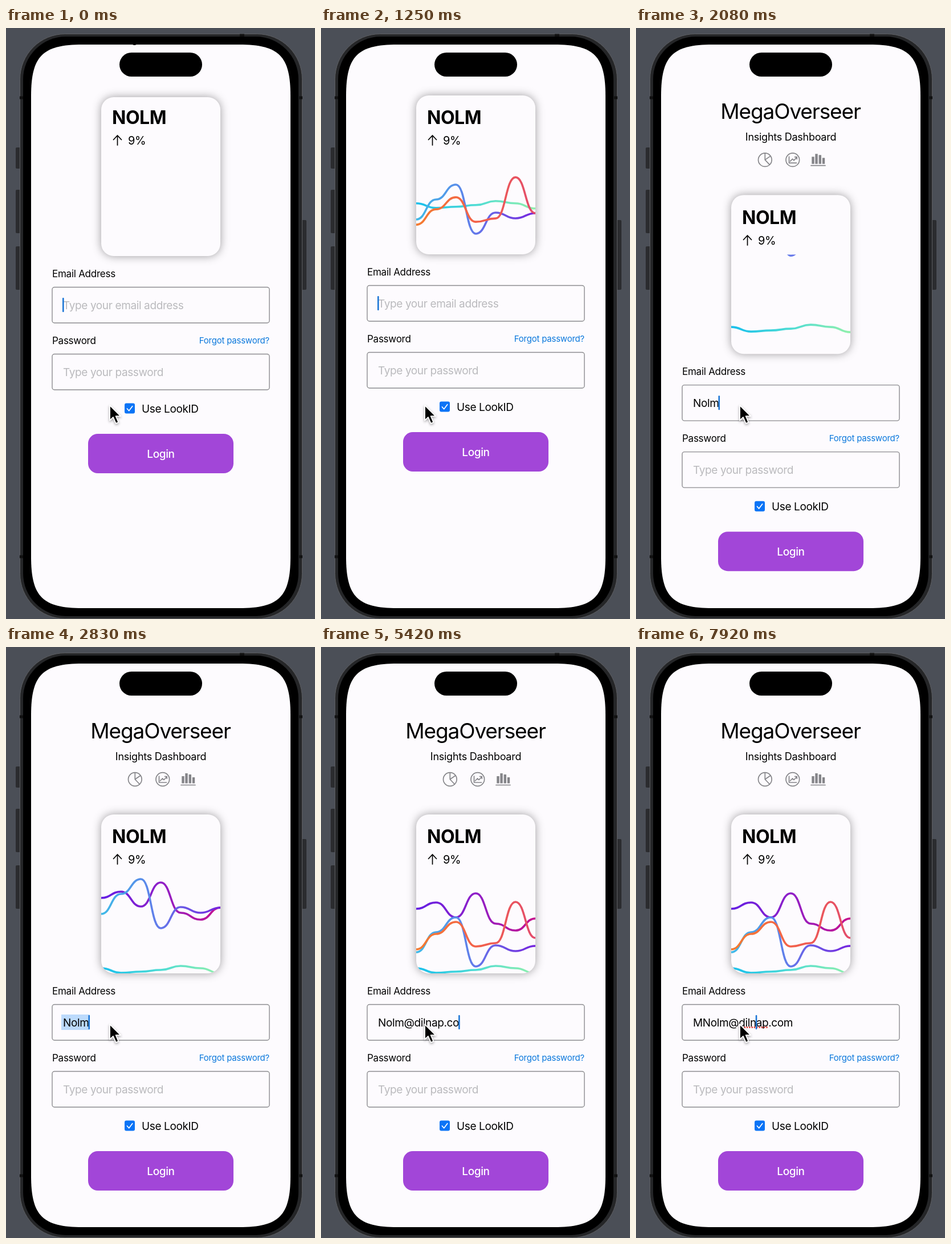
These frames come from a looping animation (542 by 1034 pixels, 8000 ms). An HTML page:

```html
<!DOCTYPE html>
<html lang="en">
<head>
<meta charset="utf-8">
<title>Login screen</title>
<style>
  html, body { margin: 0; width: 100%; height: 100%; overflow: hidden; background: #4b4f57; }
  svg { display: block; width: 542px; height: 1034px; }
  text { font-family: Inter, "Open Sans", sans-serif; letter-spacing: -.015em; white-space: pre; }
  .body { font-size: 19px; letter-spacing: -.02em; }
  .label { font-size: 17px; }
  .hint { fill: #bababd; }
  .field { fill: none; stroke: #8c8c8f; stroke-width: 1.4; }
  .icon { fill: none; stroke: #858589; stroke-width: 1.7; stroke-linecap: round; stroke-linejoin: round; }
  .card { fill: #fdfbfe; filter: drop-shadow(0 0 8px rgba(0, 0, 0, .38)); }
  .touch circle { fill: rgba(196, 196, 198, .76); stroke: #808083; stroke-width: 1.3; filter: drop-shadow(1px 3px 4px rgba(0, 0, 0, .3)); }
  .pointer { fill: #000; stroke: #fff; stroke-width: 1.8; stroke-linejoin: round; filter: drop-shadow(0 2px 2px rgba(0, 0, 0, .35)); }
</style>
</head>
<body>
<svg viewBox="0 0 542 1034">
  <defs>
    <path id="glass" d="M44 119C44 49 64 29 134 29H409C479 29 499 49 499 119V925C499 995 479 1015 409 1015H134C64 1015 44 995 44 925Z"/>
    <clipPath id="screen"><use href="#glass"/></clipPath>
    <clipPath id="plot"><path d="M167 397H376V549a22 22 0 0 1-22 22H189a22 22 0 0 1-22-22Z"/></clipPath>
  </defs>

  <g fill="#2b2c2f">
    <rect x="17" y="209" width="9" height="37" rx="2"/>
    <rect x="17" y="283" width="9" height="76" rx="2"/>
    <rect x="17" y="382" width="9" height="76" rx="2"/>
    <rect x="518" y="336" width="9" height="122" rx="2"/>
  </g>
  <rect x="24.5" y="10.5" width="495" height="1023" rx="79" fill="#252628" stroke="#5d5e61"/>
  <path d="M24 122h6m484 0h6M24 925h6m484 0h6M410 13h8" stroke="#111" stroke-width="5"/>
  <rect x="30" y="15" width="483" height="1014" rx="75"/>
  <use href="#glass" fill="#fdfbfe"/>

  <g clip-path="url(#screen)">
    <g id="page">
      <text x="271" y="160" font-size="37" text-anchor="middle" style="letter-spacing:-.03em">MegaOverseer</text>
      <text x="271.5" y="198" font-size="18" text-anchor="middle">Insights Dashboard</text>
      <g class="icon">
        <circle cx="226.3" cy="231.5" r="11.8"/>
        <path d="M226.3 220v11.5l9.5-6.5M226.3 231.5l8 8.5"/>
        <circle cx="274.8" cy="231.5" r="11.8"/>
        <path d="M268.5 226v11h13M270.5 234l4-4 2.5 2.5 5-5.5M278.5 226.5h3.7v3.7"/>
        <path d="M307 241.5h25"/>
      </g>
      <path d="M310.5 226v12.5M316.5 221v17.5M322.8 223v15.5M329 228v10.5" stroke="#858589" stroke-width="4.4"/>
      <rect class="card" x="167" y="293" width="209" height="278" rx="22"/>
    </g>

    <g id="cardText">
      <text x="186" y="343" font-size="32" font-weight="700">NOLM</text>
      <path d="M195.5 380v-17M188.5 370.5l7-7.5 7 7.5" fill="none" stroke="#000" stroke-width="1.7" stroke-linecap="round"/>
      <text x="214" y="378.5" font-size="20">9%</text>
    </g>

    <g id="form">
      <g id="lines" clip-path="url(#plot)" fill="none" stroke-width="3.6"></g>
      <text class="label" x="81" y="608">Email Address</text>
      <rect class="field" x="81" y="625.5" width="381" height="62.5" rx="4"/>
      <rect id="selection" x="97" y="643" width="52" height="27" fill="#bcdafc"/>
      <text id="hint" class="body hint" x="100" y="664">Type your email address</text>
      <text id="email" class="body" x="100" y="664"></text>
      <path id="spelling" stroke="#df3a31" stroke-width="2.8" stroke-linecap="round" stroke-dasharray="0 4.3"/>
      <rect id="caret" y="644" width="2.6" height="25" rx="1" fill="#1c76d6"/>
      <text class="label" x="81" y="725">Password</text>
      <text x="462" y="724" font-size="15" text-anchor="end" fill="#0b78dc">Forgot password?</text>
      <rect class="field" x="81" y="742.5" width="381" height="62.5" rx="4"/>
      <text class="body hint" x="100" y="781">Type your password</text>
      <rect x="208" y="828.5" width="18" height="18" rx="3" fill="#0b74f6"/>
      <path d="M212.5 838l3.2 3.7 6-8" fill="none" stroke="#fff" stroke-width="1.7" stroke-linecap="round" stroke-linejoin="round"/>
      <text class="body" x="238" y="845">Use LookID</text>
      <rect x="144" y="882" width="255" height="69" rx="17" fill="#a246d8"/>
      <text class="body" x="271.5" y="923.5" font-weight="500" text-anchor="middle" fill="#fff">Login</text>
    </g>
  </g>

  <rect x="199" y="43" width="145" height="42" rx="21"/>
  <g id="touches" class="touch">
    <circle cx="182" cy="664" r="23.5"/>
    <circle cx="361.5" cy="380.5" r="23.5"/>
  </g>
  <path class="pointer" d="M182 660v26.5l6-5.5 4.7 10.8 4.6-2-4.6-10.6h8.4Z"/>
</svg>

<script>
const FPS = 12, LOOP = 8000, KEYBOARD_LIFT = -175;
const TYPED = 'Nolm@dilnap.com';
const KEY_TICKS = [18, 20, 23, 25, 44, 48, 50, 52, 54, 56, 58, 61, 63, 65, 67];
// [tick, caret index] once typing is over
const CARET_MOVES = [[70, 12], [71, 11], [72, 5], [74, 4], [75, 0], [77, 1],
                     [85, 5], [87, 6], [88, 7], [89, 8], [91, 9], [92, 10]];
const RELEASE = 18, INSERT_M = 77;

// heights across the card, gradient, and [tick, vertical offset] steps
const LINES = [
  { ys: [562, 570, 568, 565, 558, 562, 571], colors: ['#18bfec', '#4fdcd4', '#92f0ac'],
    move: [[0, 60], [7, 12], [17, -88], [20, -83], [30, 0]] },
  { ys: [458, 447, 473, 431, 484, 496, 475], colors: ['#641fe4', '#8f20c8', '#c6108e'],
    move: [[0, 160], [7, 66], [18, -150], [20, -146], [34, -19], [42, 0]] },
  { ys: [534, 499, 473, 559, 522, 532, 523], colors: ['#3fbbe8', '#6478ea', '#7624de'],
    move: [[0, 260], [7, 140], [20, -110], [25, -160], [34, -67], [46, 0]] },
  { ys: [529, 502, 481, 524, 518, 446, 509], colors: ['#f57c30', '#f3624a', '#e34c6c'],
    move: [[0, 320], [7, 190], [20, -111], [28, -190], [34, -160], [49, 0]] },
];

const $ = id => document.getElementById(id);
const make = (tag, attrs, parent) => {
  const el = document.createElementNS('http://www.w3.org/2000/svg', tag);
  for (const k in attrs) el.setAttribute(k, attrs[k]);
  return parent.appendChild(el);
};
const show = (el, on) => el.setAttribute('visibility', on ? 'visible' : 'hidden');
const shift = (el, y) => el.setAttribute('transform', `translate(0 ${y.toFixed(2)})`);

// The curve runs level through every data point.
function curvePath(ys) {
  const step = 209 / (ys.length - 1);
  return ys.slice(1).reduce((d, y, i) => {
    const x = 167 + i * step, mid = x + step / 2;
    return d + `C${mid} ${ys[i]} ${mid} ${y} ${x + step} ${y}`;
  }, `M167 ${ys[0]}`);
}

// Monotone tangents: flat at the ends and at every turning point.
function tangents(pts) {
  const slope = i => (pts[i + 1][1] - pts[i][1]) / (pts[i + 1][0] - pts[i][0]);
  return pts.map((_, i) => {
    if (!i || i === pts.length - 1) return 0;
    const a = slope(i - 1), b = slope(i);
    return a * b <= 0 ? 0 : 2 * a * b / (a + b);
  });
}

function valueAt(pts, t) {
  const last = pts.length - 1;
  if (t >= pts[last][0]) return pts[last][1];
  const m = tangents(pts);
  const i = pts.findIndex((p, k) => k < last && t < pts[k + 1][0]);
  const [x0, y0] = pts[i], [x1, y1] = pts[i + 1];
  const h = x1 - x0, u = (t - x0) / h, v = 1 - u;
  return y0 * (1 + 2 * u) * v * v + m[i] * h * u * v * v
       + y1 * u * u * (3 - 2 * u) - m[i + 1] * h * u * u * v;
}

for (const [n, line] of LINES.entries()) {
  const grad = make('linearGradient', { id: 'ink' + n, gradientUnits: 'userSpaceOnUse', x1: 167, x2: 376, y1: 0, y2: 0 },
                    document.querySelector('defs'));
  line.colors.forEach((c, i) => make('stop', { offset: i / 2, 'stop-color': c }, grad));
  line.el = make('path', { d: curvePath(line.ys), stroke: `url(#ink${n})` }, $('lines'));
}

function pageOffset(tick) {
  if (tick < RELEASE) return KEYBOARD_LIFT + 3 * Math.exp(-tick * 1.4);
  const s = 12.8 * (tick - RELEASE) / FPS;
  return KEYBOARD_LIFT * (1 + s) * Math.exp(-s);
}

function drawEmail(tick) {
  const count = KEY_TICKS.filter(k => k <= tick).length;
  const value = (tick >= INSERT_M ? 'M' : '') + TYPED.slice(0, count);
  const moved = CARET_MOVES.filter(([k]) => k <= tick).pop();
  const email = $('email');
  email.textContent = value;
  const edge = n => 100 + (n ? email.getSubStringLength(0, n) : 0);

  show($('hint'), !value);
  $('caret').setAttribute('x', edge(moved ? moved[1] : count) - 1);
  const selected = tick >= 31 && tick < 39;
  show($('selection'), selected);
  if (selected) $('selection').setAttribute('width', edge(count) - 96);

  const flagged = tick >= 66;
  show($('spelling'), flagged);
  if (flagged) {
    const from = value.indexOf('@') + 1;
    $('spelling').setAttribute('d', `M${edge(from) + 2} 665.5H${edge(from + 6) - 1}`);
  }
}

function draw(tick) {
  const y = pageOffset(tick);
  shift($('page'), y);
  shift($('form'), y);
  shift($('cardText'), tick < RELEASE ? KEYBOARD_LIFT : 0);
  for (const line of LINES) shift(line.el, valueAt(line.move, tick));
  drawEmail(tick);
  show($('touches'), tick >= 78 && tick < 84);
}

const start = performance.now();
let shown = -1;
function frame() {
  const t = (performance.now() - start) % LOOP;
  const tick = Math.floor((t + 4) * FPS / 1000) % (LOOP * FPS / 1000);
  if (tick !== shown) draw(shown = tick);
  requestAnimationFrame(frame);
}
frame();
</script>
</body>
</html>
```
